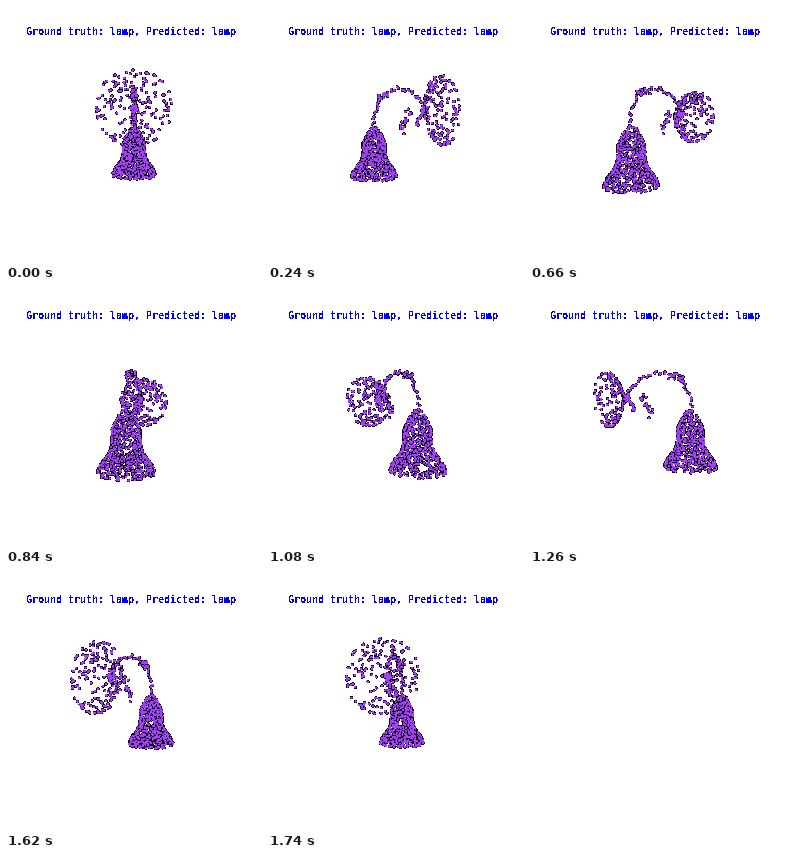
Animation of 256 by 256 pixels, one loop 1800 ms. Source, as a matplotlib script:

```python
import numpy as np
import matplotlib.pyplot as plt
from matplotlib.animation import FuncAnimation

SIZE, DPI = 256, 100
FRAMES, INTERVAL = 30, 60
FOCAL, DIST = 222, 220
FLOOR, TOP, BASE_X = -46.5, 8, -32
PURPLE, BLACK = (0.63, 0.25, 0.97, 1), (0.08, 0.02, 0.12, 1)
rng = np.random.default_rng(7)


def circle(radius, n):
    """Points at random angles on circles of the given radius."""
    a = rng.uniform(0, 2 * np.pi, n)
    return radius * np.cos(a), radius * np.sin(a)


def bell_radius(h):
    dome = 12 * np.minimum(1, (TOP - h) / 18) ** 0.6
    flare = 13 / (1 + np.exp((h + 35) / 4))
    return dome + flare


def bell(n):
    h = np.linspace(FLOOR, TOP, 400)
    r = bell_radius(h)
    pick = rng.choice(h.size, n, p=r / r.sum())
    s, u = circle(r[pick], n)
    return np.c_[s + BASE_X, u, h[pick]]


def bell_floor(n):
    s, u = circle(24 * np.sqrt(rng.random(n)), n)
    return np.c_[s + BASE_X, u, np.full(n, FLOOR)]


def shade(n, inner=0.0):
    k = np.sqrt(rng.uniform(inner, 1, n))
    u, h = circle(29 * k, n)
    return np.c_[38 + 16 * k ** 1.3, u, h + 19.5]


def neck(n):
    u, h = circle(rng.uniform(1, 3.5, n), n)
    return np.c_[rng.uniform(31, 38, n), u, h + 21]


def arm(n):
    t = np.linspace(0, np.pi, n)
    h = 14.5 - 6.5 * np.cos(t) + 30 * np.sin(t) + 4 * np.sin(2 * t)
    return np.c_[-33 * np.cos(t), 0 * t, h] + rng.normal(0, 0.9, (n, 3))


def strand(start, end, n, spread):
    """Loose row of points between two (s, h) positions."""
    (s0, h0), (s1, h1) = start, end
    line = np.linspace((s0, 0, h0), (s1, 0, h1), n)
    return line + rng.normal(0, spread, (n, 3))


cloud = np.vstack([
    bell(590), bell_floor(50),
    shade(150), shade(30, inner=0.92), neck(28), arm(44),
    strand((-25, 39), (-15, 41), 16, 2),
    strand((8, 1), (15, 22), 18, 2),
    strand((25, 6), (31, 17), 10, 1.3),
])


def project(theta):
    s, u, h = cloud.T
    x = s * np.sin(theta) + u * np.cos(theta)
    z = s * np.cos(theta) - u * np.sin(theta)
    scale = FOCAL / (DIST - z)
    return np.c_[128 + x * scale, 128 - h * scale], z


fig = plt.figure(figsize=(SIZE / DPI, SIZE / DPI), dpi=DPI, facecolor="white")
ax = fig.add_axes([0, 0, 1, 1])
ax.set_xlim(0, SIZE)
ax.set_ylim(SIZE, 0)
ax.axis("off")
ax.text(20, 29, "Ground truth: lamp, Predicted: lamp", color="blue",
        family="DejaVu Sans Mono", weight="bold", size=10 * 72 / DPI,
        va="baseline", antialiased=False)

count = len(cloud)
px = 72 / DPI
sizes = np.repeat([(2.3 * px) ** 2, (1.2 * px) ** 2], count)
colors = np.repeat([BLACK, PURPLE], count, axis=0)
dots = ax.scatter(np.zeros(2 * count), np.zeros(2 * count), s=sizes,
                  c=colors, linewidths=0, antialiased=False)


def update(i):
    xy, z = project(2 * np.pi * i / FRAMES)
    # dark halos sit slightly behind their dots
    order = np.argsort(np.r_[z - 4, z])
    dots.set_offsets(np.vstack([xy, xy])[order])
    dots.set_sizes(sizes[order], DPI)
    dots.set_facecolors(colors[order])
    return dots,


anim = FuncAnimation(fig, update, frames=FRAMES, interval=INTERVAL,
                     repeat=True, repeat_delay=0)
plt.show()
```
